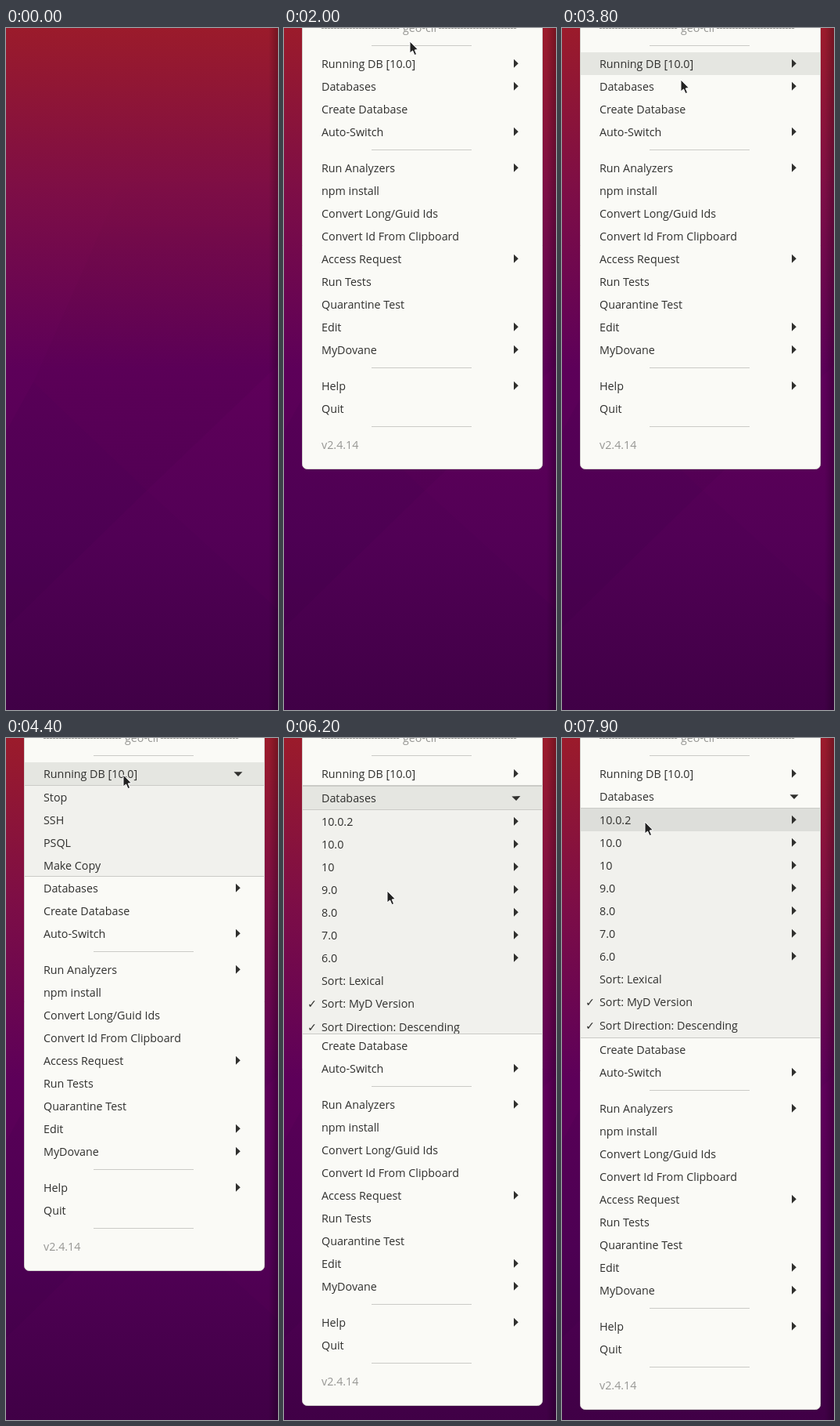
Write an HTML page with a canvas that moves like this. It is 348 px wide and 870 px high and loops after 8 s.

```html
<!DOCTYPE html>
<html lang="en">
<head>
<meta charset="utf-8">
<title>Tray menu</title>
<style>
html, body { margin: 0; width: 100%; height: 100%; overflow: hidden; background: #400046; }
canvas { display: block; width: 348px; height: 870px; }
</style>
</head>
<body>
<canvas id="stage" width="348" height="870"></canvas>
<script>
const W = 348, H = 870, LOOP = 8000, STEP = 100;
const LEFT = 24, WIDTH = 306, TEXT_X = 48, ROW = 29;
const INK = '#30302e', MUTED = '#969693', LINE = '#cbcbc7';
const SHOW = 1100, POINT = 2000, OPEN = 4217, SWAP = 6065;
const ctx = document.getElementById('stage').getContext('2d');

const item = (label, arrow) => ({ label, arrow });
const rule = { rule: true };
const running = ['Stop', 'SSH', 'PSQL', 'Make Copy'].map(s => item(s));
const versions = [
  ...['10.0.2', '10.0', '10', '9.0', '8.0', '7.0', '6.0'].map(v => item(v, true)),
  item('Sort: Lexical'),
  { label: 'Sort: MyD Version', check: true },
  { label: 'Sort Direction: Descending', check: true }
];
const menu = [
  { label: 'Running DB [10.0]', arrow: true, sub: running },
  { label: 'Databases', arrow: true, sub: versions },
  item('Create Database'), item('Auto-Switch', true), rule,
  item('Run Analyzers', true), item('npm install'), item('Convert Long/Guid Ids'),
  item('Convert Id From Clipboard'), item('Access Request', true), item('Run Tests'),
  item('Quarantine Test'), item('Edit', true), item('MyDovane', true), rule,
  item('Help', true), item('Quit'), rule,
  { label: 'v2.4.14', muted: true }
];

// Pointer glides: each eases to a new resting place
const glides = [
  { from: 2000, to: 2400, x: 160, y: 69 },
  { from: 2600, to: 3100, x: 157, y: 114 },
  { from: 3400, to: 4020, x: 150, y: 47 },
  { from: 4500, to: 5850, x: 132, y: 195 },
  { from: 6300, to: 6800, x: 112, y: 122 },
  { from: 6900, to: 7000, x: 109, y: 145 },
  { from: 7200, to: 7900, x: 106, y: 107 }
];

const clamp = p => Math.max(0, Math.min(1, p));
const smooth = p => p * p * (3 - 2 * p);

function pointer(t) {
  let x = 161, y = 17;
  for (const g of glides) {
    const p = smooth(clamp((t - g.from) / (g.to - g.from)));
    x += (g.x - x) * p;
    y += (g.y - y) * p;
  }
  return { x: Math.round(x), y: Math.round(y) };
}

function expoOut(t, start) {
  const p = clamp((t - start) / 250);
  return p === 1 ? 1 : 1 - 2 ** (-10 * p);
}

function openness(sub, t) {
  const swap = expoOut(t, SWAP);
  return sub === versions ? swap : expoOut(t, OPEN) * (1 - swap);
}

const heightOf = it => it.rule ? 17 : it.check ? 30 : ROW;

function stack(items, top) {
  let y = top;
  return items.map(it => {
    const row = { it, y, open: 0, end: y + heightOf(it) };
    y = row.end;
    return row;
  });
}

// Places all rows at time t, with the submenu boxes that are open
function layout(t) {
  const rows = stack(menu, 31), boxes = [];
  let shift = 0;
  for (const r of rows) {
    r.y += shift;
    r.end += shift;
    r.open = r.it.sub ? openness(r.it.sub, t) : 0;
    if (!r.open) continue;
    const inner = stack(r.it.sub, r.end + 1);
    const full = inner[inner.length - 1].end + 1 - r.end;
    const h = Math.floor(full * r.open);
    boxes.push({ y: r.end, h, rows: inner });
    shift += h;
  }
  return { rows, boxes, bottom: rows[rows.length - 1].end + 16 };
}

// The highlight runs one step ahead of the drawn pointer
function hovered(t, lay) {
  if (t < POINT) return null;
  if (t > SWAP && t < SWAP + 200) return menu[1];
  const y = pointer(t + STEP).y;
  const all = lay.rows.concat(...lay.boxes.map(b => b.rows));
  const hit = all.find(r => !r.it.rule && !r.it.muted && y >= r.y && y < r.end);
  return hit && hit.it;
}

function fill(color, x, y, w, h) {
  ctx.fillStyle = color;
  ctx.fillRect(x, y, w, h);
}

function poly(color, points) {
  ctx.fillStyle = color;
  ctx.beginPath();
  points.forEach(p => ctx.lineTo(...p));
  ctx.closePath();
  ctx.fill();
}

// Evenly spaced colours between two points
function gradient(x0, y0, x1, y1, ...colors) {
  const g = ctx.createLinearGradient(x0, y0, x1, y1);
  colors.forEach((c, i) => g.addColorStop(i / (colors.length - 1), c));
  return g;
}

function wallpaper() {
  const cross = [180, 590];
  fill(gradient(0, 0, 0, H, '#9b1b2b', '#7c0d47', '#5d0059', '#510055', '#400046'), 0, 0, W, H);
  poly(gradient(0, 170, 0, 300, 'rgba(0,0,0,0)', 'rgba(0,0,0,.02)'),
    [[160, 170], [W, 170], [W, 430], cross, [35, 452]]);
  poly('rgba(20,0,50,.06)', [[0, 515], [35, 452], cross, [0, 765]]);
  poly('rgba(120,0,110,.06)', [cross, [W, 430], [W, 742]]);
  fill(gradient(336, 0, W, 0, 'rgba(0,0,0,0)', 'rgba(0,0,0,.25)'), 336, 0, 12, H);
}

function text(str, x, y, color) {
  ctx.fillStyle = color;
  ctx.fillText(str, x, y);
}

function arrow(y, open) {
  ctx.save();
  ctx.translate(297, y + 14.3 + open);
  ctx.rotate(open * Math.PI / 2);
  poly(INK, [[-3, -5.5], [2.8, 0], [-3, 5.5]]);
  ctx.restore();
}

function drawRow({ it, y, open, end }, hover, shade) {
  if (it.rule) return fill(LINE, 112, y + 8, 128, 1);
  if (hover === it) fill(shade, LEFT, y, WIDTH, end - y);
  text(it.label, TEXT_X, y + 20, it.muted ? MUTED : INK);
  if (it.check) text('✓', 30, y + 20, INK);
  if (it.arrow) arrow(y, open);
}

function drawHeader() {
  ctx.strokeStyle = MUTED;
  ctx.setLineDash([3.2, 0.8]);
  for (const x of [TEXT_X, 198]) {
    ctx.beginPath();
    ctx.moveTo(x, 0.5);
    ctx.lineTo(x + 100, 0.5);
    ctx.stroke();
  }
  ctx.setLineDash([]);
  ctx.textAlign = 'center';
  text('geo-cli', 173.5, 5, MUTED);
  ctx.textAlign = 'left';
  fill(LINE, 112, 22, 128, 1);
}

function drawMenu(t) {
  const lay = layout(t), hover = hovered(t, lay);
  ctx.beginPath();
  ctx.roundRect(LEFT - 0.5, -40, WIDTH + 1, lay.bottom + 40.5, 6);
  ctx.fillStyle = '#fafaf6';
  ctx.fill();
  ctx.strokeStyle = '#d5d5d0';
  ctx.lineWidth = 1;
  ctx.stroke();

  drawHeader();
  lay.rows.forEach(r => drawRow(r, hover, '#e5e6e1'));
  for (const b of lay.boxes) {
    ctx.save();
    ctx.beginPath();
    ctx.rect(LEFT, b.y, WIDTH, b.h);
    ctx.clip();
    fill('#f1f1ed', LEFT, b.y, WIDTH, b.h);
    b.rows.forEach(r => drawRow(r, hover, '#dddeda'));
    fill(LINE, LEFT, b.y, WIDTH, 1);
    fill(LINE, LEFT, b.y + b.h - 1, WIDTH, 1);
    ctx.restore();
  }
}

function drawPointer(t) {
  const p = pointer(t);
  ctx.save();
  ctx.translate(p.x, p.y);
  poly('#222', [[0, 0], [0, 15], [3.6, 12], [6, 17.6], [8.6, 16.5], [6.2, 11], [10.4, 10.6]]);
  ctx.strokeStyle = '#fff';
  ctx.lineWidth = 1;
  ctx.stroke();
  ctx.restore();
}

function draw(t) {
  wallpaper();
  if (t < SHOW) return;
  const shown = clamp(0.12 + (t - SHOW) / 130);
  ctx.font = "14.3px 'Open Sans', 'Noto Sans', 'DejaVu Sans', sans-serif";
  ctx.save();
  ctx.translate(0, Math.round(-12.5 * (1 - shown)));
  drawMenu(t);
  ctx.restore();
  // Fade the whole menu by laying the wallpaper back over it
  ctx.globalAlpha = 1 - shown;
  wallpaper();
  ctx.globalAlpha = 1;
  if (t >= POINT) drawPointer(t);
}

const start = performance.now();
function tick() {
  const t = (performance.now() - start) % LOOP;
  draw(Math.floor(t / STEP) * STEP);
  requestAnimationFrame(tick);
}
tick();
</script>
</body>
</html>
```
